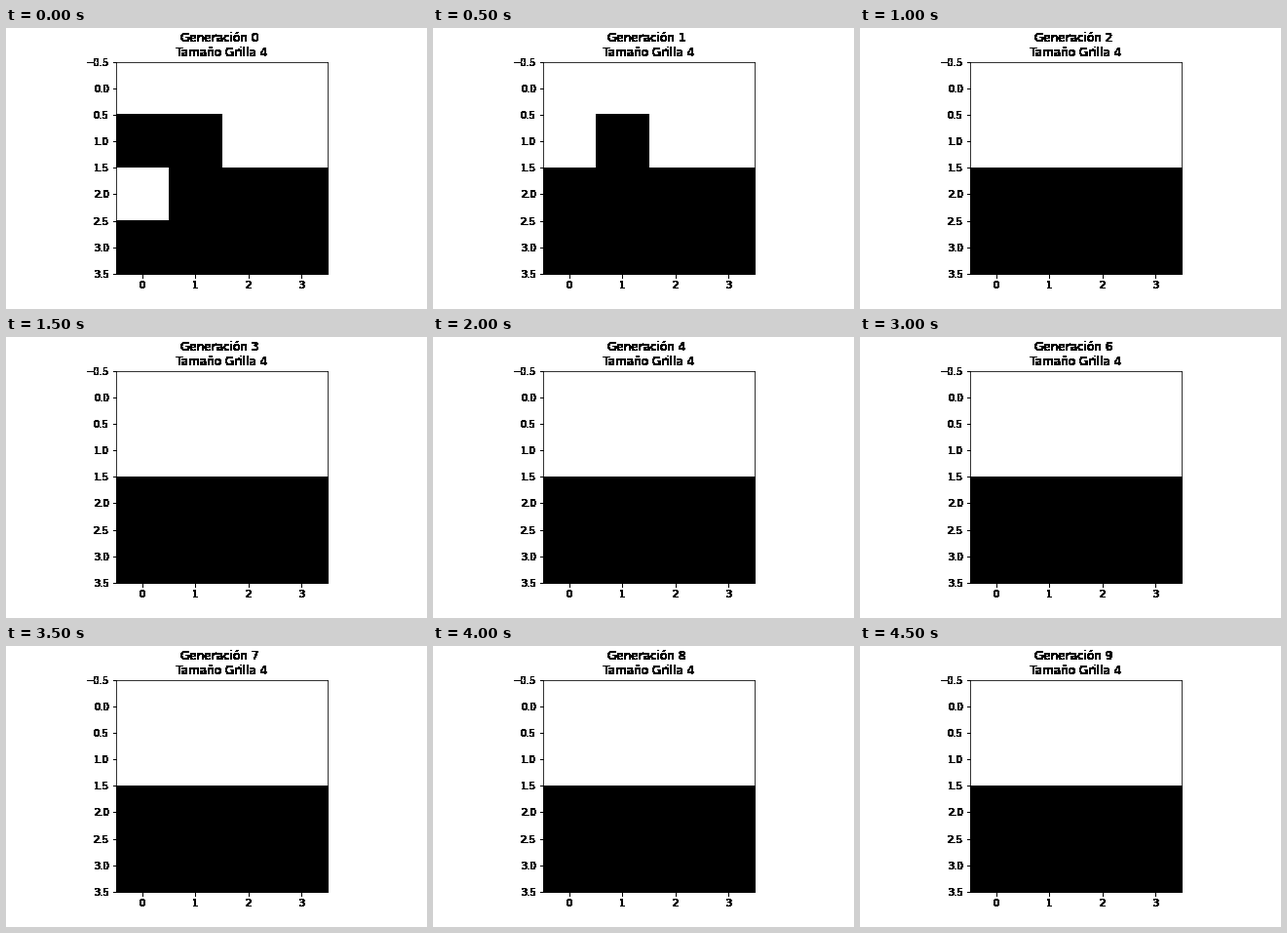
These frames come from a looping animation (432 px wide and 288 px high, 5 s). A matplotlib script:

```python
import numpy as np
import matplotlib.pyplot as plt
from matplotlib.animation import FuncAnimation
from matplotlib.transforms import Affine2D

START = ["1111", "0011", "1000", "0000"]  # 1 = white, 0 = black
SIZE = len(START)
GENERATIONS = 10
STEP_MS = 500


def evolve(grid):
    """Majority vote of each cell and its four neighbours on a torus."""
    votes = grid + sum(np.roll(grid, shift, axis)
                       for shift in (-1, 1) for axis in (0, 1))
    return (votes >= 3).astype(int)


def state(gen):
    grid = np.array([[int(cell) for cell in row] for row in START])
    for _ in range(gen):
        grid = evolve(grid)
    return grid


def harden(img, dpi):
    """Turn every touched pixel solid, which leaves hard edges."""
    out = np.zeros_like(img)
    out[..., 3] = img[..., 3] > 0
    return out, 0, 0


plt.rcParams.update({"font.family": "DejaVu Sans", "font.size": 10})
fig, ax = plt.subplots(figsize=(6, 4), dpi=72, facecolor="white")
fig.subplots_adjust(left=0.125, right=0.9, bottom=0.125, top=0.88)

image = ax.imshow(state(0), cmap="gray", vmin=0, vmax=1)
ax.set_xticks(range(SIZE))
ax.set_yticks(np.arange(-0.5, SIZE, 0.5))

# The counter sits one line above the title, slightly left of centre
title = ax.set_title(f"Tamaño Grilla {SIZE}")
counter = ax.text(0.5, 1, "", ha="center", fontsize=title.get_fontsize(),
                  transform=title.get_transform() + Affine2D().translate(-2, 0))

for part in (title, counter, ax.xaxis, ax.yaxis, ax.spines["bottom"]):
    part.set_agg_filter(harden)


def update(gen):
    image.set_data(state(gen))
    counter.set_text(f"Generación {gen}\n")
    return image, counter


anim = FuncAnimation(fig, update, frames=GENERATIONS, interval=STEP_MS,
                     repeat=True, repeat_delay=0, blit=False)
plt.show()
```
